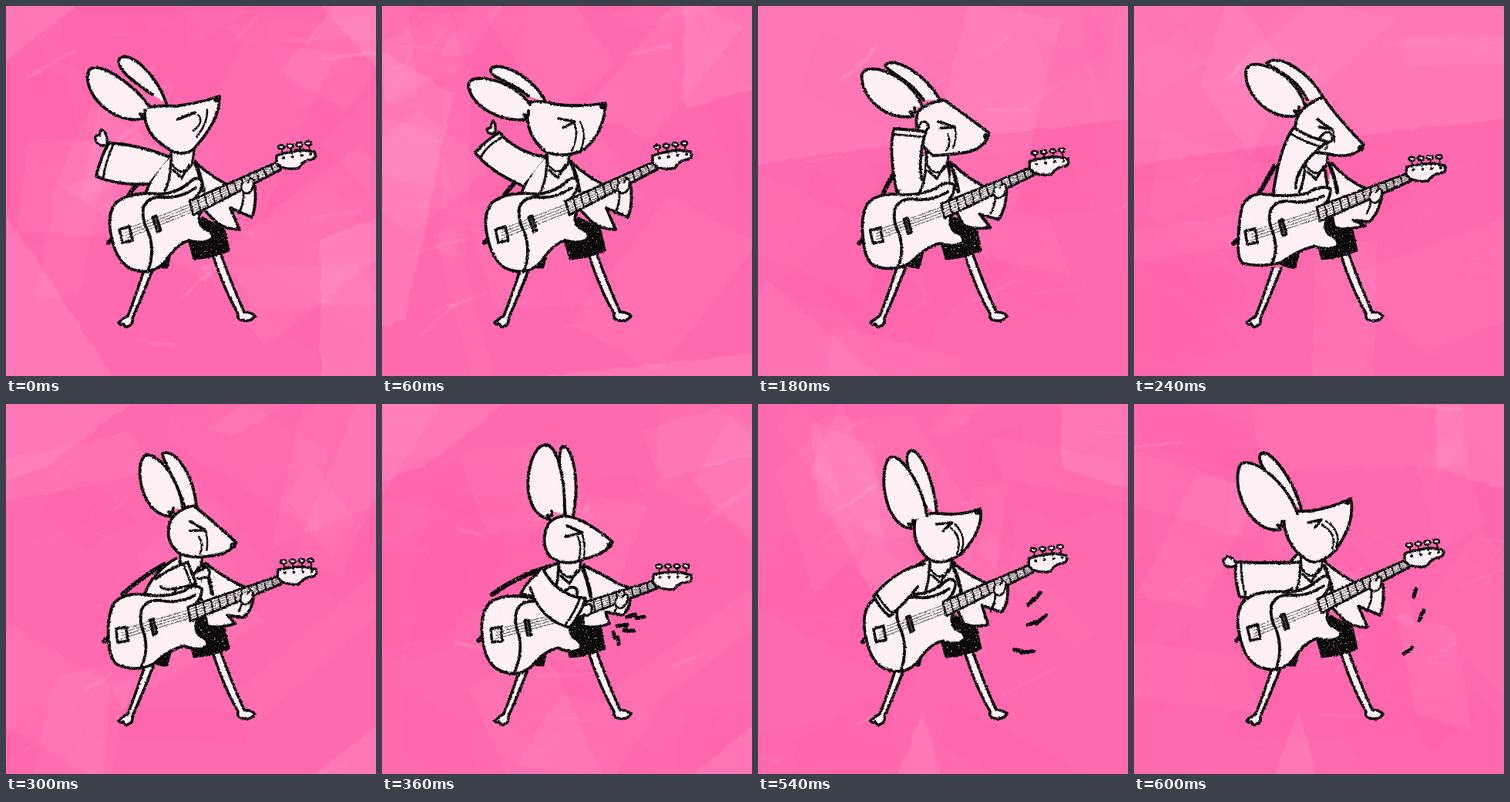
An HTML page for the animation above (660 ms loop, 480x480 px).

```html
<!DOCTYPE html>
<html>
<head>
<meta charset="utf-8">
<style>
html, body { margin: 0; width: 100%; height: 100%; overflow: hidden; background: #ff69ad }
svg { display: block; width: 100vw; height: 100vh }
</style>
</head>
<body>
<svg id="stage" viewBox="0 0 480 480"></svg>
<script>
const STEP = 60, COUNT = 11, PALE = '#fdf1f5', INK = '#0c0a0b';

// Parts shared by most poses; a pose overrides what moves.
const base = {
  torso: 'M213 194 Q190 215 180 246 L256 264 L246 203',
  strap: 'M170 232 Q160 242 157 250',
  jacket: 'M246 203 Q268 224 300 238 L323 234 Q325 260 319 274 L291 262 L303 290 Q285 290 272 280 L255 262 L245 245',
  collar: 'translate(0 0)',
  guitar: 'translate(0 0) rotate(0 180 290) scale(1 1)',
  body: 'M240 255 Q256 240 254 227 Q248 219 238 229 Q222 243 200 244 Q160 240 142 256 Q130 272 137 300 Q143 330 160 340 Q188 352 206 332 Q222 308 238 304 Q258 310 268 301 Q270 293 256 288 Q246 278 254 264 M246 236 Q225 250 205 248 Q184 246 178 262 Q176 278 184 292 Q194 316 184 345',
  marks: ''
};
const poses = [];
const pose = parts => poses.push({ ...base, ...parts });

pose({
  bg: 'M390 0H480V100Z M0 0H110L0 90Z M0 250L150 480H0Z M400 300L480 270V480H400Z',
  backEar: 'M208 126 C195 90 165 60 148 67 C140 78 160 95 190 115',
  frontEar: 'M186 130 C160 95 110 65 106 88 C102 120 145 155 178 146',
  head: 'M180 132 Q200 128 220 130 Q250 126 277 117 Q278 148 243 186 Q228 196 212 186 Q176 165 180 132',
  eye: 'M222 147 L245 138 L228 145',
  cheek: 'M261 134 Q262 152 247 170 M249 141 Q258 150 243 162',
  arm: 'M212 196 Q170 179 133 178 Q122 198 117 221 Q145 233 183 231',
  cuff: 'M139 180 Q128 205 126 224',
  hand: 'M131 180 Q132 165 125 161 Q121 160 122 168 Q113 166 117 176 Q121 183 131 180'
});
pose({
  bg: 'M385 0H480V110L385 140Z M0 60L100 120L40 400L0 410Z M100 480L480 440V480Z',
  backEar: 'M212 124 C195 90 150 70 141 82 C140 95 165 95 190 117',
  frontEar: 'M192 128 C170 95 115 85 112 102 C114 130 155 152 188 147',
  head: 'M190 125 Q210 122 222 127 Q255 132 290 126 Q288 165 262 186 Q240 198 213 190 Q182 165 190 125',
  eye: 'M229 146 L250 150 L235 158',
  cheek: 'M249 151 Q256 168 246 188 M257 150 Q266 168 258 186',
  arm: 'M212 196 Q175 190 152 164 Q134 175 121 190 Q140 215 182 233',
  cuff: 'M156 170 Q137 180 128 196',
  hand: 'M147 164 Q148 152 144 149 Q141 154 141 158 Q134 158 137 163 Q139 168 147 164'
});
pose({
  bg: 'M0 0H300L220 60L0 70Z M320 0H480V90Z M0 440L160 300L300 480H0Z',
  backEar: 'M226 124 C205 90 165 68 157 80 C160 92 185 100 204 122',
  frontEar: 'M204 130 C185 92 130 78 124 95 C125 120 150 148 190 144',
  head: 'M203 128 Q220 120 238 126 Q272 134 302 150 Q298 180 262 188 Q248 196 222 198 Q196 175 203 128',
  eye: 'M230 153 L256 154 L233 160',
  cheek: 'M253 157 Q257 175 246 192 M246 160 Q249 175 240 190',
  arm: 'M215 215 Q206 180 186 150 Q165 150 146 160 Q148 190 178 240',
  cuff: 'M187 157 Q168 158 147 167',
  hand: 'M174 150 Q173 138 176 136 Q180 133 184 137 Q188 136 188 142 Q188 148 184 150',
  strap: 'M178 215 Q163 235 162 248'
});
pose({
  bg: 'M0 0H480V150L130 190L0 210Z',
  backEar: 'M246 119 C228 88 190 60 172 74 C180 82 210 90 225 122',
  frontEar: 'M222 130 C210 85 150 62 145 84 C143 118 180 150 212 142',
  head: 'M210 150 Q215 130 245 118 Q268 150 298 180 Q290 196 262 194 Q245 190 232 190 Q205 175 210 150',
  eye: 'M238 147 L256 160 L240 157',
  cheek: 'M258 160 Q260 168 260 176 M246 172 Q254 180 248 186',
  arm: 'M210 236 Q208 210 250 176 Q228 171 207 158 Q190 180 181 240',
  cuff: 'M244 183 Q224 178 204 166',
  hand: 'M240 172 Q248 162 252 164 Q258 166 257 172 Q258 176 252 177 Q247 178 244 176',
  strap: 'M182 208 Q170 230 160 246',
  jacket: 'M257 204 Q275 226 303 238 L322 244 Q318 268 305 280 L284 278 L300 285 Q270 292 260 287 L255 262 L250 245',
  collar: 'translate(8 2)',
  guitar: 'translate(-3 4) rotate(3.6 180 290) scale(1 1)',
  body: 'M240 255 Q256 245 254 228 Q240 224 225 236 Q200 243 170 241 Q150 240 142 256 Q138 272 139 300 Q139 328 147 332 Q172 336 196 328 Q218 310 238 304 Q258 310 268 301 Q270 293 256 288 Q246 278 254 264 M246 238 Q225 250 205 248 Q184 246 178 262 Q176 278 184 292 Q192 314 184 330'
});
pose({
  bg: 'M0 0H180L60 90L0 110Z M380 480L480 400V480Z',
  backEar: 'M248 146 C258 90 244 52 234 55 C226 65 232 110 238 142',
  frontEar: 'M237 143 C238 90 225 52 212 53 C190 52 172 140 218 150',
  head: 'M216 155 Q228 143 242 146 Q265 150 299 179 Q290 195 262 201 Q238 212 218 198 Q204 180 216 155',
  eye: 'M240 158 L260 167 L238 172',
  cheek: 'M260 170 Q265 185 261 203 M254 172 Q260 185 255 203',
  arm: 'M192 238 Q205 280 243 290 Q257 275 264 252 Q228 250 208 213',
  cuff: 'M237 288 Q250 270 257 252',
  hand: 'M260 262 Q270 258 272 262 Q273 268 270 272 Q266 276 262 273 Q256 277 253 276',
  torso: 'M228 207 Q195 216 180 246 L256 264 L262 208',
  strap: 'M228 208 Q180 220 143 247',
  jacket: 'M262 210 Q285 220 308 234 L320 238 Q326 262 312 274 L290 270 L295 285 Q275 292 262 288 L258 262 L250 245',
  collar: 'translate(15 10)',
  guitar: 'translate(-4 6) rotate(7 180 290) scale(.985 1)',
  marks: 'M318 276 L328 273 L330 278 L340 276 M305 288 L318 286 L314 294 L327 294 M300 296 L302 303 L306 303 L307 311'
});
pose({
  bg: 'M20 480L130 380V480Z M380 0H480V60Z M430 420L480 400V480Z',
  backEar: 'M246 145 C252 100 242 52 230 57 C216 65 220 100 232 143',
  frontEar: 'M226 148 C228 100 215 58 204 60 C184 64 178 150 208 160',
  head: 'M214 155 Q228 142 243 145 Q270 156 296 149 Q298 172 268 198 Q240 212 218 200 Q203 180 214 155',
  eye: 'M237 158 L260 158 L245 169',
  cheek: 'M262 160 Q274 180 264 200 M256 164 Q268 180 259 201',
  arm: 'M217 210 Q180 220 168 293 Q184 299 204 301 Q213 260 209 235',
  cuff: 'M169 287 Q186 294 205 294',
  hand: 'M200 300 Q204 304 202 308 Q200 314 188 304 Q185 304 178 305 Q172 308 175 297',
  torso: 'M228 207 Q195 216 180 246 L256 264 L262 208',
  strap: 'M193 218 Q172 235 155 253',
  jacket: 'M262 211 Q280 222 308 234 L325 238 Q325 262 312 266 L290 260 L294 282 Q275 292 262 290 L258 262 L250 245',
  collar: 'translate(15 10)',
  guitar: 'translate(12 5) rotate(2.6 180 290) scale(.956 1)',
  marks: 'M338 271 L352 259 L352 264 L366 250 M330 292 L350 289 L348 297 L371 281 M315 313 L330 320 L326 325 L354 325'
});
pose({
  bg: 'M385 0H480V120L385 90Z M180 480L215 390L240 480Z',
  backEar: 'M218 140 C205 90 172 55 164 65 C158 75 175 95 205 125',
  frontEar: 'M212 142 C195 95 148 65 137 80 C126 110 150 168 190 163',
  head: 'M194 142 Q210 138 228 139 Q255 135 281 123 Q288 150 263 188 Q240 212 224 202 Q193 182 194 142',
  eye: 'M226 154 L243 150 L235 160',
  cheek: 'M249 152 Q270 165 262 186 M244 157 Q264 168 257 188',
  arm: 'M215 205 Q180 207 132 205 Q130 228 137 250 Q170 256 205 240',
  cuff: 'M139 206 Q138 228 146 252',
  hand: 'M131 210 Q120 214 117 207 Q113 202 119 200 Q121 195 126 200 Q130 200 131 205',
  strap: 'M172 243 Q166 246 160 250',
  collar: 'translate(2 8)',
  marks: 'M363 250 L364 246 L364 245 L366 240 M370 281 L372 276 L373 273 L376 268 M350 324 L354 321 L357 320 L361 316'
});

const NUM = /-?(\d+(\.\d+)?|\.\d+)/g;
function middle(a, b) {
  const n = b.match(NUM);
  let k = 0;
  return a.replace(NUM, v => (+v + +n[k++]) / 2);
}
function poseAt(i) {
  const at = i < 2 ? i : i / 2 + 1;
  const a = poses[Math.floor(at)], b = poses[Math.ceil(at)];
  if (a === b) return a;
  const p = {};
  for (const key in a) p[key] = key === 'bg' ? b.bg : middle(a[key], b[key]);
  return p;
}

const line = (d, width = 3.8, fill = 'none') =>
  `<path d="${d}" fill="${fill}" stroke="${INK}" stroke-width="${width}"/>`;
const shape = (d, width) => line(d, width, PALE);
const group = (move, inner) => `<g transform="${move}">${inner}</g>`;
const range = n => [...Array(n).keys()];

function random(seed) {
  return () => {
    seed = (seed * 16807) % 2147483647;
    return seed / 2147483647;
  };
}

function backdrop(i, light) {
  const r = random(7919 * (i + 3));
  r();
  const patches = range(18).map(() => {
    const w = 70 + r() * 190, h = 25 + r() * 110;
    return `<rect x="${-w / 2}" y="${-h / 2}" width="${w}" height="${h}" fill="${r() < .5 ? '#fff' : '#ff4f9f'}"
      opacity="${.03 + r() * .035}" transform="translate(${r() * 480} ${r() * 480}) rotate(${r() * 180}) skewX(${r() * 40})"/>`;
  });
  const scratches = range(16).map(() => {
    const x = r() * 480, y = r() * 480, a = -.9 + r() * 1.3, l = 20 + r() * 70;
    return `<path d="M${x} ${y}l${l * Math.cos(a)} ${l * Math.sin(a)}" stroke="#fff"
      stroke-width="${1 + r() * 4}" opacity="${.03 + r() * .08}"/>`;
  });
  const paint = `<path d="${light}" fill="#fff" opacity=".1"/>` + patches.join('') + scratches.join('');
  return `<rect width="480" height="480" fill="#ff69ad"/>
    <g filter="url(#brush)">${group('translate(-12 -12) scale(1.05)', paint)}</g>`;
}

const legs =
  shape('M180 340 Q169 374 158 402 Q150 407 146 411 Q149 415 152 412 Q155 419 159 415 Q165 414 164 405 Q177 376 191 340', 3.6) +
  shape('M268 322 Q283 368 301 399 Q299 407 308 408 Q318 410 323 402 Q318 397 309 397 Q293 362 278 320', 3.6) +
  line('M190 334 Q200 340 209 339 L214 318 L198 318Z', 3, INK) +
  line('M236 300 L244 328 Q268 326 289 317 L283 290 L255 275Z', 3, INK);

const frets = range(11).map(k => {
  const t = (k + 1) / 12;
  return `M${238 + 115 * t} ${253 - 51 * t}L${243 + 114 * t} ${271 - 59 * t}`;
}).join('');
const strings = range(4).map(k => `M155 ${290 + k * 4}L${239 + k} ${257 + k * 3.4}L${354 + k} ${205 + k * 1.6}`).join('');
const pegs = range(4).map(k => {
  const x = 357 + k * 11.7, y = 183 - k * 1.6;
  return line(`M${x} ${y}L${x + 2} ${y + 10}`, 2) +
    `<ellipse cx="${x}" cy="${y}" rx="4" ry="2.6" fill="${PALE}" stroke="${INK}" stroke-width="2.6"/>` +
    `<circle cx="${x + 3}" cy="${y + 14}" r="2" fill="${INK}"/>`;
}).join('');

const guitar = body =>
  line('M138 302 L133 307', 6) + shape(body) +
  line('M147 290 L160 286 L164 304 L151 307Z', 3.5) +
  line('M190 274 L195 272 L201 291 L196 293Z', 3, '#444') +
  shape('M238 253 L353 202 L357 212 L243 271Z', 3.2) +
  line(frets, 2) + line(strings, .7) +
  shape('M351 204 L351 194 Q370 188 385 187 L400 189 Q404 197 396 199 Q386 200 380 210 Q370 213 357 209Z', 3.4) +
  pegs + shape('M306 231 Q304 243 313 243 Q322 240 321 226 Q317 221 314 229', 2.6);

function figure(p, armInFront) {
  const face = p.head.match(NUM);
  const arm = shape(p.hand, 3.2) + shape(p.arm) + line(p.cuff, 2.8);
  const bass = group(p.guitar, guitar(p.body));
  const tuft = 'l-4 -6l6 1l0 -6';
  return legs + line(p.strap, 6) + shape(p.torso) + shape(p.jacket) +
    line('M302 269 Q309 255 308 242', 2.8) +
    group(p.collar,
      shape('M214 182 L215 205 Q228 224 241 206 L245 182', 3) +
      line('M217 213 L228 223 L238 206 M214 196 Q214 225 206 240', 3.4) +
      line('M245 202 Q252 218 256 240', 5)) +
    shape(p.backEar) + shape(p.head) + shape(p.frontEar + tuft) +
    `<circle cx="${face[8] - 4}" cy="${+face[9] + 4}" r="4" fill="${INK}"/>` +
    line(p.eye, 3.6) + line(p.cheek, 2.4) +
    (armInFront ? bass + arm : arm + bass) + line(p.marks, 5);
}

function scene(i) {
  const p = poseAt(i);
  const area = 'filterUnits="userSpaceOnUse" x="-20" y="-20" width="520" height="520" color-interpolation-filters="sRGB"';
  return `<filter id="brush" ${area}>
      <feTurbulence type="fractalNoise" baseFrequency=".06" numOctaves="3" seed="${i + 1}"/>
      <feDisplacementMap in="SourceGraphic" scale="8" xChannelSelector="R" yChannelSelector="G"/>
    </filter>
    <filter id="ink" ${area}>
      <feTurbulence type="fractalNoise" baseFrequency=".4" numOctaves="2" seed="${i + 20}" result="noise"/>
      <feDisplacementMap in="SourceGraphic" in2="noise" scale="3" xChannelSelector="R" yChannelSelector="G" result="rough"/>
      <feColorMatrix in="noise" values="0 0 0 0 .99  0 0 0 0 .9  0 0 0 0 .94  5 0 0 0 -3.3"/>
      <feComposite in2="rough" operator="atop"/>
    </filter>
    ${backdrop(i, p.bg)}
    <g filter="url(#ink)" stroke-linecap="round" stroke-linejoin="round">${figure(p, i > 4 && i < 10)}</g>`;
}

const stage = document.getElementById('stage');
const scenes = range(COUNT).map(scene);
const start = performance.now();
let shown = -1;
function draw() {
  const i = Math.floor((performance.now() - start) / STEP) % COUNT;
  if (i !== shown) stage.innerHTML = scenes[shown = i];
  requestAnimationFrame(draw);
}
draw();
</script>
</body>
</html>
```
